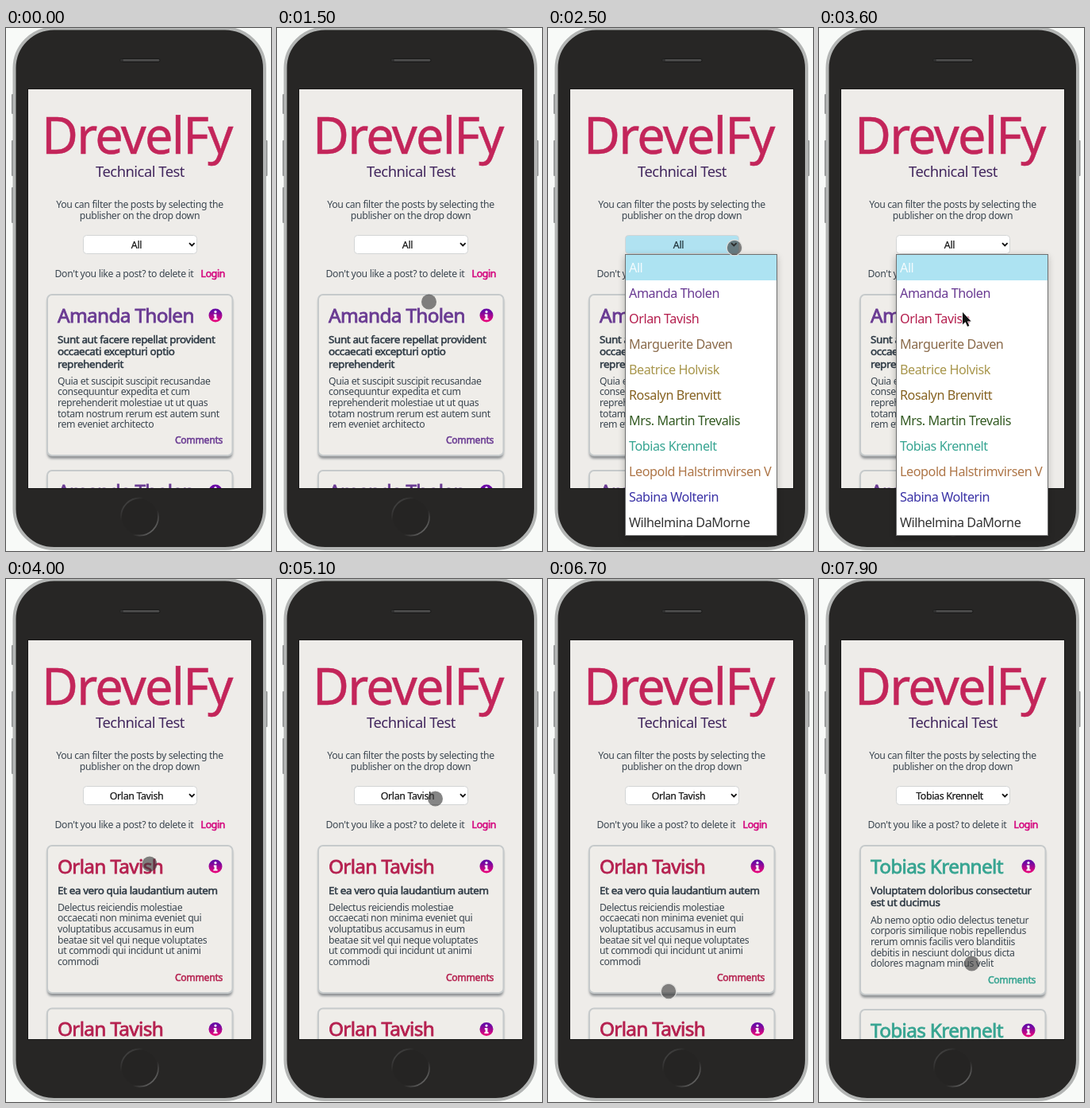
An HTML page that plays this animation: 334 by 657 pixels, repeating every 8000 ms.

```html
<!DOCTYPE html>
<html lang="en">
<head>
<meta charset="utf-8">
<title>Post filter demo</title>
<style>
html, body { margin: 0; width: 100%; height: 100%; overflow: hidden; background: #f8faf8; }
svg { display: block; width: 334px; height: 657px; font-family: "Noto Sans", "Open Sans", sans-serif; }
text { white-space: pre; letter-spacing: -.028em; }
</style>
</head>
<body>
<svg id="stage" viewBox="0 0 334 657" xmlns="http://www.w3.org/2000/svg"></svg>
<script>
const LOOP = 8000, STEP = 100;
const BODY = 12.25, INK = '#3b4650';
const stage = document.getElementById('stage');

const people = [
  ['All', '#222'],
  ['Amanda Tholen', '#693a92'],
  ['Orlan Tavish', '#b5204f'],
  ['Marguerite Daven', '#8a6a4a'],
  ['Beatrice Holvisk', '#a8964c'],
  ['Rosalyn Brenvitt', '#866220'],
  ['Mrs. Martin Trevalis', '#335a22'],
  ['Tobias Krennelt', '#36a491'],
  ['Leopold Halstrimvirsen V', '#ae7648'],
  ['Sabina Wolterin', '#3a32a6'],
  ['Wilhelmina DaMorne', '#333']
];

// One entry per publisher choice; bottom = lower card edge, next = offset of the second card.
const posts = [
  { pick: 0, author: 1, bottom: 537, next: 221, bodyY: 447.5, linkY: 522,
    title: ['Sunt aut facere repellat provident', 'occaecati excepturi optio', 'reprehenderit'],
    body: ['Quia et suscipit suscipit recusandae', 'consequuntur expedita et cum',
      'reprehenderit molestiae ut ut quas', 'totam nostrum rerum est autem sunt', 'rem eveniet architecto'] },
  { pick: 2, author: 2, bottom: 520, next: 204.5, bodyY: 416.5, linkY: 505,
    title: ['Et ea vero quia laudantium autem'],
    body: ['Delectus reiciendis molestiae', 'occaecati non minima eveniet qui',
      'voluptatibus accusamus in eum', 'beatae sit vel qui neque voluptates',
      'ut commodi qui incidunt ut animi', 'commodi'] },
  { pick: 7, author: 7, bottom: 522, next: 206, bodyY: 432.5, linkY: 507.5,
    title: ['Voluptatem doloribus consectetur', 'est ut ducimus'],
    body: ['Ab nemo optio odio delectus tenetur', 'corporis similique nobis repellendus',
      'rerum omnis facilis vero blanditiis', 'debitis in nesciunt doloribus dicta',
      'dolores magnam minus velit'] }
];

// Pointer path: time, x, y
const path = [
  [900, 318, 528], [1000, 238, 490], [1100, 170, 453], [1200, 170, 453],
  [1300, 174, 432], [1500, 191.5, 344], [1700, 217, 304], [1900, 234, 283],
  [2000, 234, 283], [2200, 235, 276], [2900, 235, 276],
  [3000, 250, 283], [3200, 281, 308], [3400, 228, 344], [3600, 181, 357],
  [3900, 181, 358], [4500, 181, 358], [4700, 179, 340], [4900, 190, 300], [5100, 199.5, 276],
  [5500, 199.5, 276], [5600, 193, 305], [5900, 151.5, 473], [6200, 167, 508],
  [6400, 152, 518], [7200, 152, 518], [7300, 215, 522], [7400, 265, 523],
  [7600, 265, 523], [7700, 272, 514], [7800, 156, 492], [7900, 192.5, 483]
];

function text(s, x, y, size, fill, opt = {}) {
  const bold = opt.bold ? ` stroke="${fill}" stroke-width="${opt.bold}"` : '';
  return `<text x="${x}" y="${y}" font-size="${size}" fill="${fill}" text-anchor="${opt.anchor || 'start'}"${bold}>${s}</text>`;
}

function rect(x, y, w, h, r, fill, extra = '') {
  return `<rect x="${x}" y="${y}" width="${w}" height="${h}" rx="${r}" fill="${fill}" ${extra}/>`;
}

function cardTop(p, dy) {
  const [name, color] = people[p.author];
  const h = p.bottom - 335;
  return `<g transform="translate(0 ${dy})">` +
    rect(52, 336, 233.5, h + 1, 6, '#8f9395', 'filter="url(#soft)"') +
    rect(52, 335, 233.5, h, 6, '#efede9', 'stroke="#c6cacb" stroke-width="2"') +
    text(name, 65, 369.5, 24.4, color, { bold: .8 }) +
    '<circle cx="264" cy="361" r="8.5" fill="url(#info)"/>' +
    '<circle cx="264" cy="356.6" r="1.6" fill="#fff"/>' +
    '<path d="M261.8 359.6h3.6v5.2h1.2v1.8h-5.2v-1.8h1.2v-3.4h-.8z" fill="#fff"/></g>';
}

function cards(p) {
  return cardTop(p, p.next) + cardTop(p, 0) +
    p.title.map((s, i) => text(s, 65, 396 + i * 15.4, 13.45, '#2d3944', { bold: .5 })).join('') +
    p.body.map((s, i) => text(s, 65, p.bodyY + i * 13.7, BODY, INK)).join('') +
    text('Comments', 273, p.linkY, BODY, people[p.author][1], { bold: .5, anchor: 'end' });
}

function picker(p, active) {
  return rect(97.5, 260.5, 143, 23, 4, active ? '#b0e2f1' : '#fff', 'stroke="#d3d5d5"') +
    text(people[p.pick][0], 164.5, 276.5, 12.4, active ? '#1f3238' : '#111', { bold: .2, anchor: 'middle' }) +
    '<path d="M231 270.2l3.3 3.3 3.3-3.3" fill="none" stroke="#111" stroke-width="1.8"/>';
}

function menu(p) {
  return rect(97, 284, 191, 353, 0, '#000', 'filter="url(#glow)" opacity=".28"') +
    rect(97.5, 284.5, 191, 353, 0, '#fff', 'stroke="#707070"') +
    people.map(([name, color], i) => {
      const y = 285 + 32 * i, on = i === p.pick;
      return (on ? rect(98, y, 190, 32, 0, '#ade3f2') : '') +
        text(name, 102, y + 21.8, 16.2, on ? '#f4fbfd' : color);
    }).join('');
}

function phone() {
  const side = (x, y, h) => rect(x, y, 3, h, 1, '#8d8f8f');
  return side(7, 83, 25) + side(7, 141, 45) + side(7, 200, 45) + side(326.5, 141, 45) +
    rect(10.5, .5, 315.5, 653.5, 50, '#272625', 'stroke="#b3b5b4" stroke-width="4"') +
    rect(144, 38.5, 50, 4, 2, '#494949', 'stroke="#171717"') +
    '<circle cx="146" cy="40.5" r="2" fill="#303030"/>' +
    '<circle cx="168.5" cy="614" r="23.5" fill="#252423" stroke="url(#home)" stroke-width="1.8"/>' +
    rect(27, 76, 283, 503, 0, '#171717') + rect(28, 77, 281, 501, 0, '#eeece9');
}

function header() {
  const mid = { anchor: 'middle' };
  return text('DrevelFy', 45, 157.5, 63, '#c3255a', { bold: .5 }) +
    text('Technical Test', 169, 187, 18.4, '#43285f', mid) +
    text('You can filter the posts by selecting the', 168.5, 226, BODY, INK, mid) +
    text('publisher on the drop down', 168.5, 240.2, BODY, INK, mid) +
    text("Don't you like a post? to delete it", 61.5, 313, BODY, INK) +
    text('Login', 276, 313, BODY, '#d4087f', { bold: .6, anchor: 'end' });
}

stage.innerHTML = `<defs>
  <linearGradient id="info" x2="0" y2="1"><stop offset=".2" stop-color="#6a0aa5"/><stop offset=".9" stop-color="#e3057c"/></linearGradient>
  <linearGradient id="home" x2="1" y2="1"><stop offset="0" stop-color="#555"/><stop offset=".3" stop-color="#272625"/><stop offset=".65" stop-color="#272625"/><stop offset="1" stop-color="#858585"/></linearGradient>
  <filter id="soft" x="-10%" y="-10%" width="120%" height="120%"><feOffset dy="2"/><feGaussianBlur stdDeviation="1.6"/></filter>
  <filter id="glow" x="-15%" y="-10%" width="130%" height="120%"><feOffset dy="3"/><feGaussianBlur stdDeviation="5"/></filter>
  <clipPath id="screen"><rect x="28" y="77" width="281" height="501"/></clipPath>
  </defs>${phone()}<g clip-path="url(#screen)">${header()}<g id="page"></g></g><g id="popup"></g>
  <g id="dot"><circle r="9.5" fill="#3a3a3a" fill-opacity=".62"/><circle id="ring" r="9.8" fill="none" stroke="#dcdcda" stroke-width="1.2"/></g>
  <path id="arrow" d="M0 0V15.5l3.6-3.3 2.5 5.8 2.3-1-2.5-5.6h4.8z" fill="#111" stroke="#fff" stroke-width="1.6" paint-order="stroke"/>`;

const el = id => document.getElementById(id);
const page = el('page'), popup = el('popup'), dot = el('dot'), ring = el('ring'), arrow = el('arrow');
const within = (t, a, b) => t >= a && t < b;
const show = (node, on) => { node.style.display = on ? '' : 'none'; };

function place(t) {
  const i = path.findIndex(k => k[0] > t);
  if (i < 0) return path[path.length - 1].slice(1);
  const [t0, x0, y0] = path[i - 1], [t1, x1, y1] = path[i];
  const f = (t - t0) / (t1 - t0);
  return [x0 + (x1 - x0) * f, y0 + (y1 - y0) * f];
}

let shown = '';
function draw(now) {
  const t = Math.floor(now % LOOP / STEP) * STEP;
  const post = posts[t < 4000 ? 0 : t < 6800 ? 1 : 2];
  const open = within(t, 2500, 3800) || within(t, 5400, 6600);
  const active = within(t, 2500, 2600) || within(t, 5400, 5500);
  const key = [post.pick, open, active].join();
  if (key !== shown) {
    shown = key;
    page.innerHTML = cards(post) + picker(post, active);
    popup.innerHTML = open ? menu(post) : '';
  }
  const seen = t >= 900;
  const [x, y] = seen ? place(t) : [0, 0];
  const native = open && y > 284;
  show(dot, seen && !native);
  show(arrow, seen && native);
  show(ring, active || within(t, 6600, 6800));
  for (const node of [dot, arrow]) node.setAttribute('transform', `translate(${x} ${y})`);
}

const start = performance.now();
function tick() {
  draw(performance.now() - start);
  requestAnimationFrame(tick);
}
tick();
</script>
</body>
</html>
```
